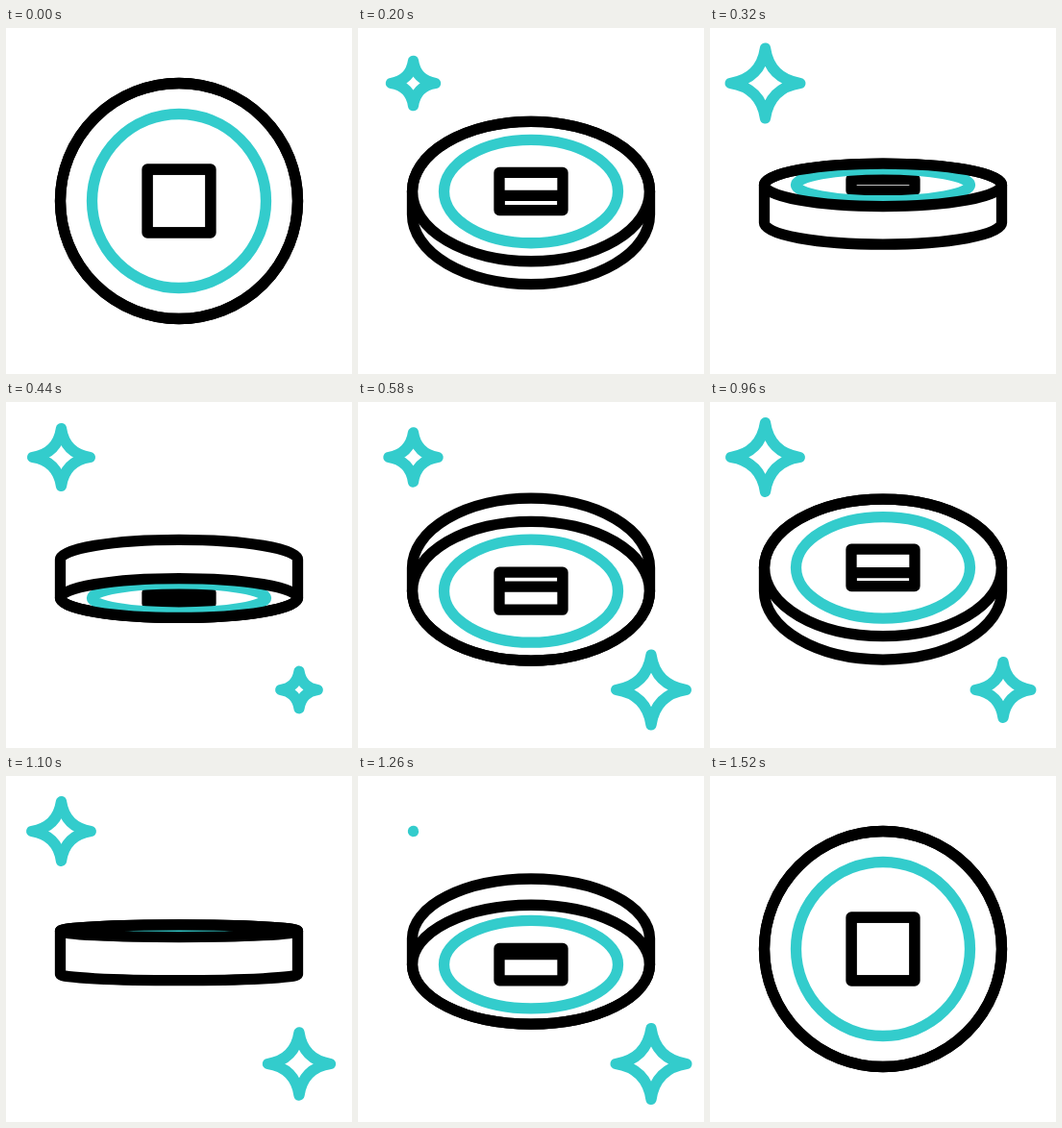
An HTML page with a canvas for the animation above (1900 ms loop, 360x360 px).

```html
<!DOCTYPE html>
<html>
<head>
<meta charset="utf-8">
<style>
  html, body { margin: 0; width: 100%; height: 100%; overflow: hidden; background: #fff; }
  canvas { display: block; width: 360px; height: 360px; }
</style>
</head>
<body>
<canvas id="stage" width="360" height="360"></canvas>
<script>
const ctx = document.getElementById('stage').getContext('2d');
const LOOP = 1900, SPIN = 1520, STEP = 20;
const BLACK = '#000', TEAL = '#33cccc';

// [time, quarter turns]
const TURN = [[0, 0], [200, 0.505], [440, 1.155], [720, 1.835], [960, 2.514], [1260, 3.427], [1520, 4]];
// [time, arm length]
const TWINKLE = [[80, 0], [280, 38.5], [540, 24.5], [1060, 38.5], [1260, 0]];
const SPARKLES = [{ x: 57.5, y: 57.5, delay: 0 }, { x: 305, y: 299.5, delay: 260 }];

function segment(keys, t) {
  let i = 0;
  while (i < keys.length - 2 && t >= keys[i + 1][0]) i++;
  return i;
}

function linear(keys, t) {
  const i = segment(keys, t), [t0, v0] = keys[i], [t1, v1] = keys[i + 1];
  const u = Math.min(1, Math.max(0, (t - t0) / (t1 - t0)));
  return v0 + (v1 - v0) * u;
}

function smooth(keys, t) {
  const i = segment(keys, t), [t0, v0] = keys[i], [t1, v1] = keys[i + 1];
  const slope = n => {
    const a = keys[Math.max(0, n - 1)], b = keys[Math.min(keys.length - 1, n + 1)];
    return (b[1] - a[1]) / (b[0] - a[0]);
  };
  const span = t1 - t0, u = (t - t0) / span, w = 1 - u;
  return v0 * w * w * (1 + 2 * u) + v1 * u * u * (3 - 2 * u)
    + span * u * w * (slope(i) * w - slope(i + 1) * u);
}

function stroke(color) {
  ctx.strokeStyle = color;
  ctx.stroke();
}

function ring(y, rx, ry, color) {
  ctx.beginPath();
  ctx.ellipse(180, y, rx, ry, 0, 0, 2 * Math.PI);
  stroke(color);
}

function holePath(y, half) {
  ctx.beginPath();
  ctx.rect(147, y - half, 66, 2 * half);
}

function drawCoin(t) {
  const turn = smooth(TURN, t), quarter = Math.floor(turn), part = turn - quarter;
  const faceUp = quarter % 2 === 0;
  const tilt = faceUp ? part : 1 - part;
  const squash = (1 - tilt * tilt) / (1 + tilt * tilt);
  const middle = 180 + 5 * Math.sin(Math.PI * t / SPIN);
  const half = 23.75 * tilt;
  const front = middle + (faceUp ? -half : half);
  const back = 2 * middle - front;
  const ry = 122.5 * squash;

  // Outline of the whole body
  ctx.beginPath();
  ctx.ellipse(180, middle - half, 123.5, ry, 0, Math.PI, 2 * Math.PI);
  ctx.ellipse(180, middle + half, 123.5, ry, 0, 0, Math.PI);
  ctx.closePath();
  stroke(BLACK);

  // Far edge of the hole, seen through the near one
  const holeHalf = 33 * squash;
  ctx.save();
  holePath(front, holeHalf);
  ctx.clip();
  holePath(back, holeHalf);
  stroke(BLACK);
  ctx.restore();
  holePath(front, holeHalf);
  stroke(BLACK);

  ring(front, 90.5, 90.5 * squash, TEAL);
  ring(front, 123.5, ry, BLACK);
}

function drawSparkle({ x, y, delay }, t) {
  const time = t - delay;
  if (time <= 80 || time > 1270) return;
  const arm = Math.max(0.05, linear(TWINKLE, time)), k = arm * 0.13;
  ctx.save();
  ctx.translate(x, y);
  ctx.beginPath();
  ctx.moveTo(0, -arm);
  ctx.quadraticCurveTo(k, -k, arm, 0);
  ctx.quadraticCurveTo(k, k, 0, arm);
  ctx.quadraticCurveTo(-k, k, -arm, 0);
  ctx.quadraticCurveTo(-k, -k, 0, -arm);
  ctx.closePath();
  stroke(TEAL);
  ctx.restore();
}

function draw(now) {
  const t = Math.min(SPIN, Math.floor((now % LOOP) / STEP) * STEP);
  ctx.fillStyle = '#fff';
  ctx.fillRect(0, 0, 360, 360);
  ctx.lineWidth = 11.3;
  ctx.lineJoin = ctx.lineCap = 'round';
  drawCoin(t % SPIN);
  if (t < SPIN) SPARKLES.forEach(s => drawSparkle(s, t));
}

let start;
function tick(now) {
  start ??= now;
  draw(now - start);
  requestAnimationFrame(tick);
}
draw(0);
requestAnimationFrame(tick);
</script>
</body>
</html>
```
